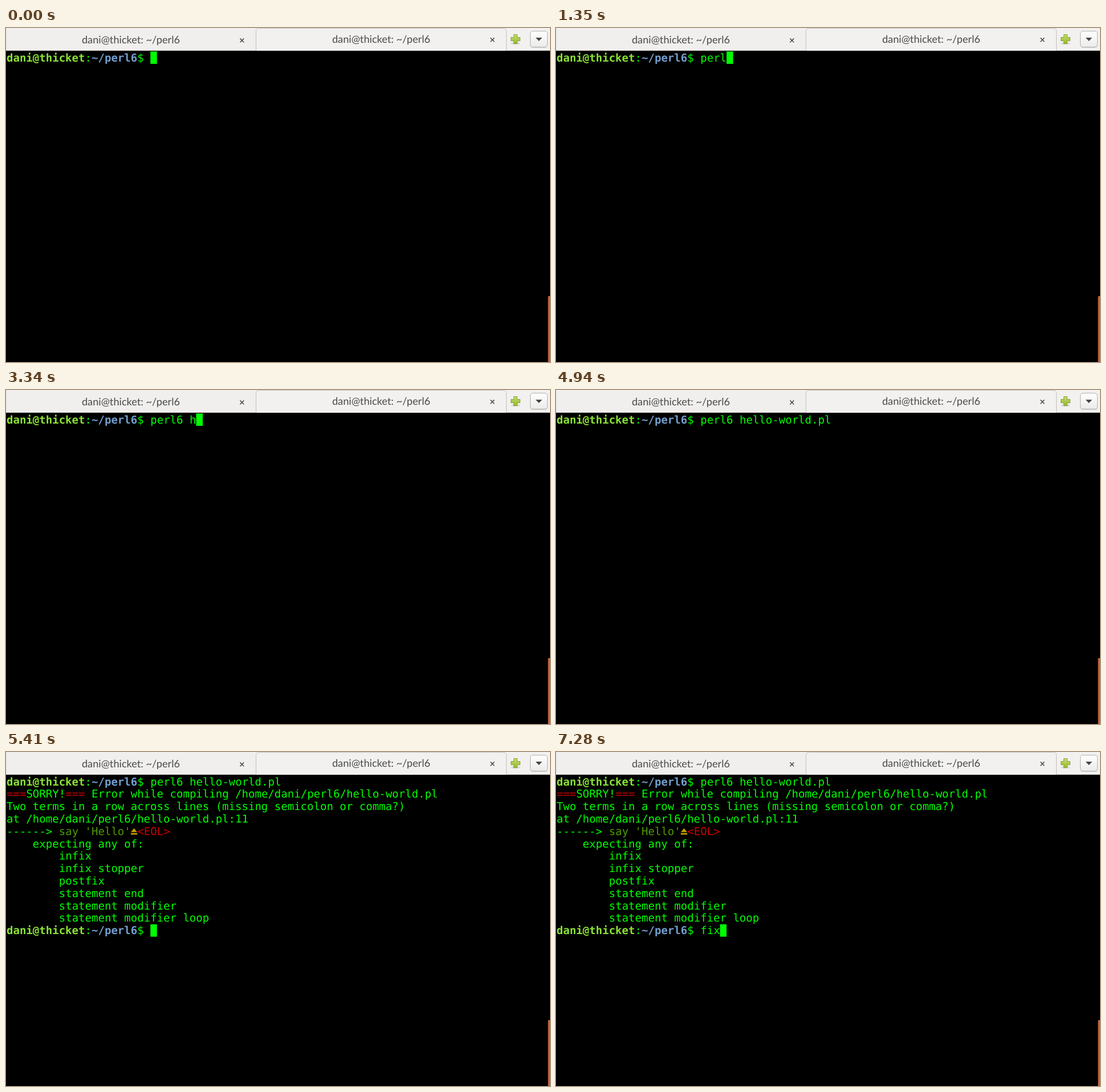
Recreate the animation shown at these times as an HTML page. Size 954x587 px, loop 8000 ms.

```html
<!DOCTYPE html>
<html lang="en">
<head>
<meta charset="utf-8">
<title>Terminal session</title>
<style>
  html, body { margin: 0; width: 100%; height: 100%; overflow: hidden; background: #000; }
  svg { display: block; width: 100%; height: 100%; }
  text { white-space: pre; text-rendering: geometricPrecision; }
  #term text { font: 19.04px "DejaVu Sans Mono", monospace; }
  #term .b { font-weight: bold; }
  .title { font: 18.2px Lato, sans-serif; fill: #4a4a4a; text-anchor: middle; }
  .close { stroke: #4a4a4a; stroke-width: 1.5; }
</style>
</head>
<body>
<svg viewBox="0 0 954 587" preserveAspectRatio="none">
  <defs>
    <linearGradient id="btn" x2="0" y2="1">
      <stop offset="0" stop-color="#fff"/><stop offset="1" stop-color="#ebebea"/>
    </linearGradient>
    <linearGradient id="plus" x2="0" y2="1">
      <stop offset="0" stop-color="#c6dc72"/><stop offset="1" stop-color="#97b92c"/>
    </linearGradient>
  </defs>
  <rect width="954" height="587"/>

  <rect width="954" height="40" fill="#f2f1f0"/>
  <rect y="1" width="438" height="39" fill="#f0efee"/>
  <path d="M0 39.5H438.5M878 39.5H954" stroke="#d3d0cc"/>
  <path d="M.5 1V39" stroke="#e2e0dd"/>
  <path d="M438.5 40V5.5Q438.5 .5 443.5 .5H872.5Q877.5 .5 877.5 5.5V40" fill="#f2f1f0" stroke="#c4c1bc"/>
  <text class="title" x="219" y="27.4">dani@thicket: ~/perl6</text>
  <text class="title" x="658" y="26.4">dani@thicket: ~/perl6</text>
  <path class="close" d="M410.4 18.4l6.8 6.8m0-6.8l-6.8 6.8M849.6 17.4l6.8 6.8m0-6.8l-6.8 6.8"/>

  <ellipse cx="893.5" cy="27" rx="8" ry="2" fill="#000" opacity=".12"/>
  <path d="M890.5 11.5h6v5h5v6h-5v5h-6v-5h-5v-6h5z" fill="url(#plus)" stroke="#86a336" stroke-linejoin="round"/>
  <rect x="919.5" y="6" width="30.5" height="29" rx="4.5" fill="#000" opacity=".1"/>
  <rect x="919.5" y="5.5" width="30" height="28" rx="4.5" fill="url(#btn)" stroke="#b4b0aa"/>
  <path d="M928.8 17h11.4l-5.7 6z" fill="#464646"/>

  <g id="term"></g>
  <path d="M950.5 587V473Q950.5 471 952.5 471H954V587z" fill="#c8633c"/>
</svg>
<script>
const LOOP = 8000, LEFT = 1, TOP = 41.2, CELL = 11.465, ROW = 21.8, PROMPT = 22;
const GREEN = '#0f0', RED = '#c00', OLIVE = '#4e9a06';
const term = document.getElementById('term');

const colX = col => LEFT + col * CELL;
const rowY = row => TOP + row * ROW;

function add(parent, tag, attrs) {
  const el = document.createElementNS('http://www.w3.org/2000/svg', tag);
  for (const key in attrs) el.setAttribute(key, attrs[key]);
  return parent.appendChild(el);
}

function put(parent, row, col, str, fill = GREEN, cls = '') {
  const el = add(parent, 'text', { x: colX(col), y: rowY(row) + 17.4, fill, class: cls });
  el.textContent = str;
  return el;
}

function prompt(parent, row) {
  put(parent, row, 0, 'dani@thicket', '#8ae234', 'b');
  put(parent, row, 12, ':');
  put(parent, row, 13, '~/perl6', '#729fcf', 'b');
  put(parent, row, 20, '$');
  return put(parent, row, PROMPT, '');
}

const first = prompt(term, 0);

const errors = add(term, 'g', {});
put(errors, 1, 0, '===', RED);
put(errors, 1, 3, 'SORRY!');
put(errors, 1, 9, '===', RED);
put(errors, 1, 13, 'Error while compiling /home/dani/perl6/hello-world.pl');
put(errors, 2, 0, 'Two terms in a row across lines (missing semicolon or comma?)');
put(errors, 3, 0, 'at /home/dani/perl6/hello-world.pl:11');
put(errors, 4, 0, '------>');
put(errors, 4, 8, "say 'Hello'", OLIVE);
add(errors, 'path', { d: 'M224.5 134.3l5.6 6.5h-11.2zM218.9 142.4h11.2v2.9h-11.2z', fill: '#c4a000' });
put(errors, 4, 20, '<EOL>', RED);
put(errors, 5, 4, 'expecting any of:');
['infix', 'infix stopper', 'postfix', 'statement end', 'statement modifier', 'statement modifier loop']
  .forEach((str, i) => put(errors, 6 + i, 8, str));

const next = add(term, 'g', {});
const second = prompt(next, 12);
const cursor = add(term, 'rect', { width: CELL, height: 21.8, fill: GREEN });

// Typed text by time in ms
const command = [
  [0, ''], [570, 'p'], [1220, 'pe'], [1285, 'per'], [1350, 'perl'], [2310, 'perl6'], [2560, 'perl6 '],
  [3340, 'perl6 h'], [3470, 'perl6 he'], [3590, 'perl6 hel'], [3710, 'perl6 hello-world.'],
  [4850, 'perl6 hello-world.p'], [4940, 'perl6 hello-world.pl']
];
const followUp = [[0, ''], [7050, 'f'], [7140, 'fi'], [7280, 'fix']];
const HIDE = 3710, ERROR = 5310, READY = 5410;

const typed = (keys, t) => keys.filter(key => key[0] <= t).pop()[1];
const show = (el, on) => el.setAttribute('visibility', on ? 'visible' : 'hidden');

function render(t) {
  const ready = t >= READY;
  first.textContent = typed(command, t);
  second.textContent = typed(followUp, t);
  show(errors, t >= ERROR);
  show(next, ready);
  show(cursor, t < HIDE || ready);
  cursor.setAttribute('x', colX(PROMPT + (ready ? second : first).textContent.length));
  cursor.setAttribute('y', rowY(ready ? 12 : 0));
}

const start = performance.now();
function tick() {
  render((performance.now() - start) % LOOP);
  requestAnimationFrame(tick);
}
tick();
</script>
</body>
</html>
```
